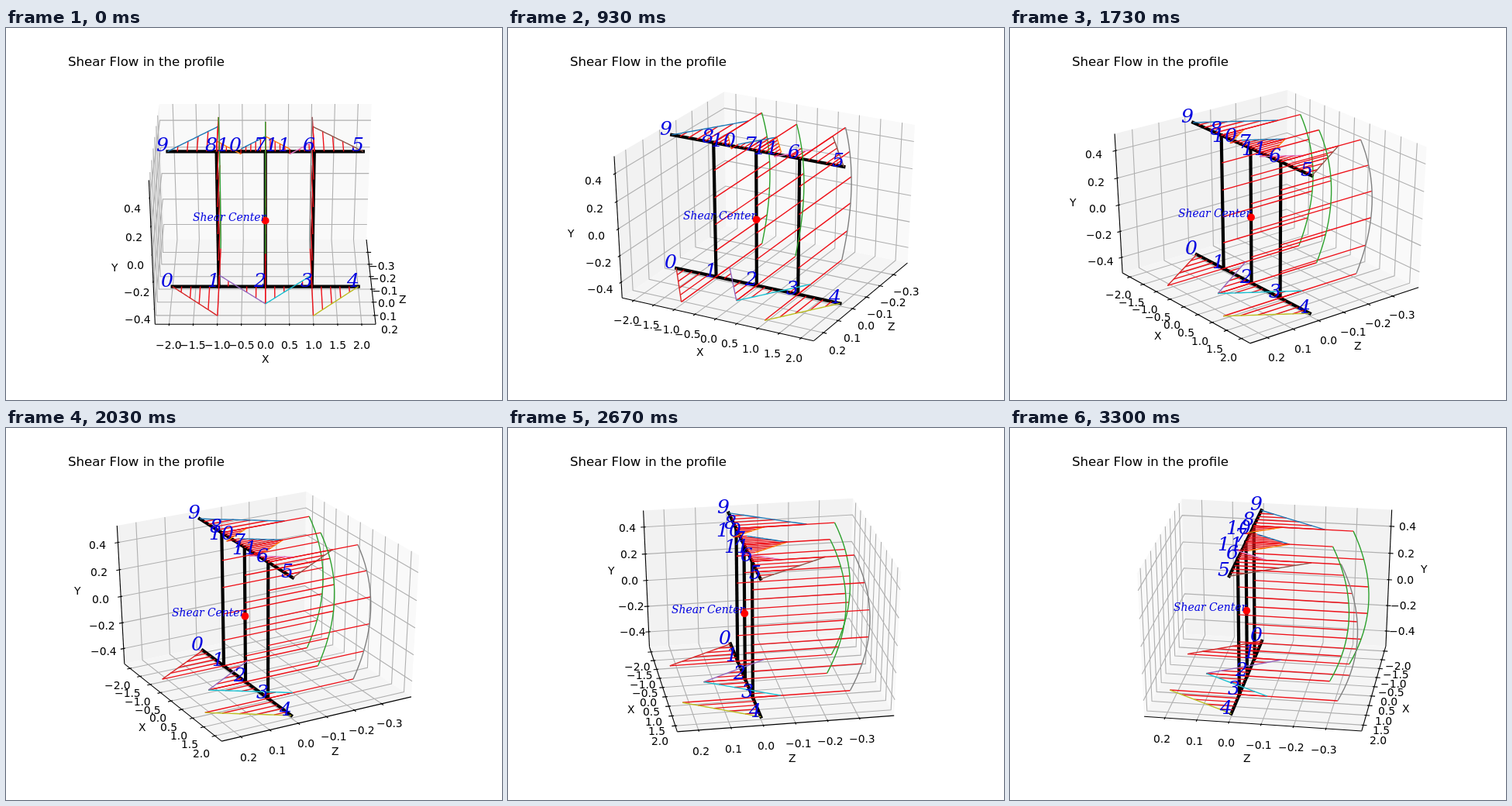
An HTML page with a canvas for the animation above (3.33 s loop, 640 by 480 pixels).

```html
<!DOCTYPE html>
<html lang="en">
<head>
<meta charset="utf-8">
<title>Shear flow</title>
<style>
  html, body { margin: 0; width: 100%; height: 100%; overflow: hidden; background: #fff; }
  canvas { display: block; width: 640px; height: 480px; }
</style>
</head>
<body>
<canvas id="stage" width="640" height="480"></canvas>
<script>
const ctx = document.getElementById('stage').getContext('2d');
const SANS = '"DejaVu Sans", sans-serif';
const SERIF = '"DejaVu Serif", "Noto Serif", serif';
const LOOP = 3330;
const EDGE = 25 / 48;          // half the box, panes included
const STEP = 1 / 12;
const SIN_E = 0.5, COS_E = Math.sqrt(3) / 2;
let sinA = 0, cosA = 1;

// Points are [z, x, y], scaled to a unit box around the origin.
const unit = [z => (z + 0.0722) / 0.6478, x => x / 4.4, y => y];
const at = (x, y, z = 0) => [unit[0](z), unit[1](x), unit[2](y)];

function project([z, x, y]) {
  const side = cosA * x - sinA * z;
  const toward = sinA * x + cosA * z;
  const depth = 10 - toward * COS_E - y * SIN_E;
  return [334.7 + 2681 * side / depth,
          237.4 - 1997.8 * (y * COS_E - toward * SIN_E) / depth];
}

function trace(points) {
  ctx.beginPath();
  for (const p of points) ctx.lineTo(...project(p));
}

function line(points, color, width) {
  trace(points);
  ctx.strokeStyle = color;
  ctx.lineWidth = width;
  ctx.stroke();
}

// Text sits on whole pixels; align is the share of its width left of x.
function text(str, [x, y], font, align, color = '#000') {
  ctx.font = font;
  ctx.fillStyle = color;
  const left = x - align * ctx.measureText(str).width;
  ctx.fillText(str, Math.round(left), Math.round(y));
}

const withValue = (p, i, v) => p.map((c, j) => j === i ? v : c);
const flip = (p, i) => withValue(p, i, -p[i]);
const range = (from, to, step) =>
  Array.from({ length: Math.round((to - from) / step) + 1 }, (_, i) => from + i * step);

const axes = [
  { name: 'Z', ticks: range(-0.3, 0.2, 0.1), side: 1 },
  { name: 'X', ticks: range(-2, 2, 0.5), side: 0 },
  { name: 'Y', ticks: range(-0.4, 0.4, 0.2), side: 0 }
];
const paneColors = ['#f9f9f9', '#f2f2f2', '#f5f5f5'];

const tickText = v => (v < -0.01 ? '\u2212' : '') + Math.abs(v).toFixed(1);

function drawBox() {
  const far = [cosA < -1e-9 ? EDGE : -EDGE, -EDGE, -EDGE];
  paneColors.forEach((color, i) => {
    const j = (i + 1) % 3, k = (i + 2) % 3;
    trace([far, flip(far, j), flip(flip(far, j), k), flip(far, k)]);
    ctx.fillStyle = color;
    ctx.fill();
  });
  axes.forEach(({ ticks }, i) => {
    for (const v of ticks) {
      const p = withValue(far, i, unit[i](v));
      line([flip(p, (i + 1) % 3), p, flip(p, (i + 2) % 3)], '#b0b0b0', 1.11);
    }
  });
  axes.forEach(({ name, ticks, side }, i) => {
    const base = flip(far, side);
    const outward = (p, d) => p.map((c, j) => j === i ? c : c + Math.sign(c) * d);
    line([base, flip(base, i)], '#000', 1.11);
    for (const v of ticks) {
      const p = withValue(base, i, unit[i](v));
      const s = Math.sign(p[side]) * STEP;
      line([withValue(p, side, p[side] - 0.1 * s),
            withValue(p, side, p[side] + 0.2 * s)], '#000', 1.11);
      const [x, y] = project(outward(p, 0.0738));
      text(tickText(v), [x, y + 11], '13.89px ' + SANS, 0.5);
    }
    const [x, y] = project(outward(withValue(base, i, 0), 0.1605));
    text(name, [x, y + 4], '13.89px ' + SANS, 0.5);
  });
}

const nodes = [
  [-2, -0.5], [-1, -0.5], [0, -0.5], [1, -0.5], [2, -0.5], [2, 0.5],
  [1, 0.5], [0, 0.5], [-1, 0.5], [-2, 0.5], [-0.5, 0.5], [0.5, 0.5]
];

// Flow rises by SLOPE per unit of flange; CELL closes the two cells.
const SLOPE = 2 / 9, CELL = 4 / 45, MID = SLOPE - CELL, CUT = SLOPE / 2 - CELL;
const OUTER = -SLOPE - CELL, INNER = -2 * MID, BULGE = -SLOPE / 4;

// from, to, flow at both ends, colour, extra flow at mid-length
const members = [
  [9, 8, 0, -SLOPE, '#1f77b4', 0],
  [8, 10, -CELL, CUT, '#ff7f0e', 0],
  [8, 1, OUTER, OUTER, '#2ca02c', BULGE],
  [1, 0, SLOPE, 0, '#d62728', 0],
  [1, 2, -CELL, MID, '#9467bd', 0],
  [6, 5, -SLOPE, 0, '#8c564b', 0],
  [6, 11, -CELL, CUT, '#e377c2', 0],
  [6, 3, OUTER, OUTER, '#7f7f7f', BULGE],
  [3, 4, SLOPE, 0, '#bcbd22', 0],
  [3, 2, -CELL, MID, '#17becf', 0],
  [7, 10, -MID, -CUT, '#1f77b4', 0],
  [7, 11, -MID, -CUT, '#ff7f0e', 0],
  [7, 2, INNER, INNER, '#2ca02c', BULGE]
];

function drawFlow([from, to, q0, q1, color, bulge]) {
  const [x0, y0] = nodes[from], [x1, y1] = nodes[to];
  const along = (s, q) => at(x0 + (x1 - x0) * s, y0 + (y1 - y0) * s, q);
  const tip = s => along(s, q0 + (q1 - q0) * s + bulge * 4 * s * (1 - s));
  for (const s of range(0, 1, 0.2)) line([along(s, 0), tip(s)], '#ee1018', 1.39);
  line(range(0, 1, 0.05).map(tip), color, 1.39);
}

function draw(degrees) {
  sinA = Math.sin(degrees * Math.PI / 180);
  cosA = Math.cos(degrees * Math.PI / 180);
  ctx.fillStyle = '#fff';
  ctx.fillRect(0, 0, 640, 480);
  ctx.lineCap = 'butt';
  drawBox();

  ctx.lineCap = 'square';
  for (const [a, b] of members) line([at(...nodes[a]), at(...nodes[b])], '#000', 4.17);
  ctx.lineCap = 'butt';
  members.forEach(drawFlow);

  const center = project(at(0, 0));
  ctx.beginPath();
  ctx.arc(...center, 4.9, 0, 7);
  ctx.fillStyle = '#f00';
  ctx.fill();
  text('Shear Center', center, 'italic 13.89px ' + SERIF, 1, '#0000e0');
  nodes.forEach((n, i) => {
    const [x, y] = project(at(...n));
    text(String(i), [x + 1, y], 'italic 25px ' + SERIF, 1, '#0000e0');
  });
  text('Shear Flow in the profile', [80, 49], '16.6px ' + SANS, 0);
}

// One degree per step, three steps every 100 ms (30, 40, 30).
const start = performance.now();
function tick() {
  const t = (performance.now() - start) % LOOP;
  const rest = t % 100;
  draw(3 * Math.floor(t / 100) + (rest >= 30) + (rest >= 70));
  requestAnimationFrame(tick);
}
tick();
</script>
</body>
</html>
```
